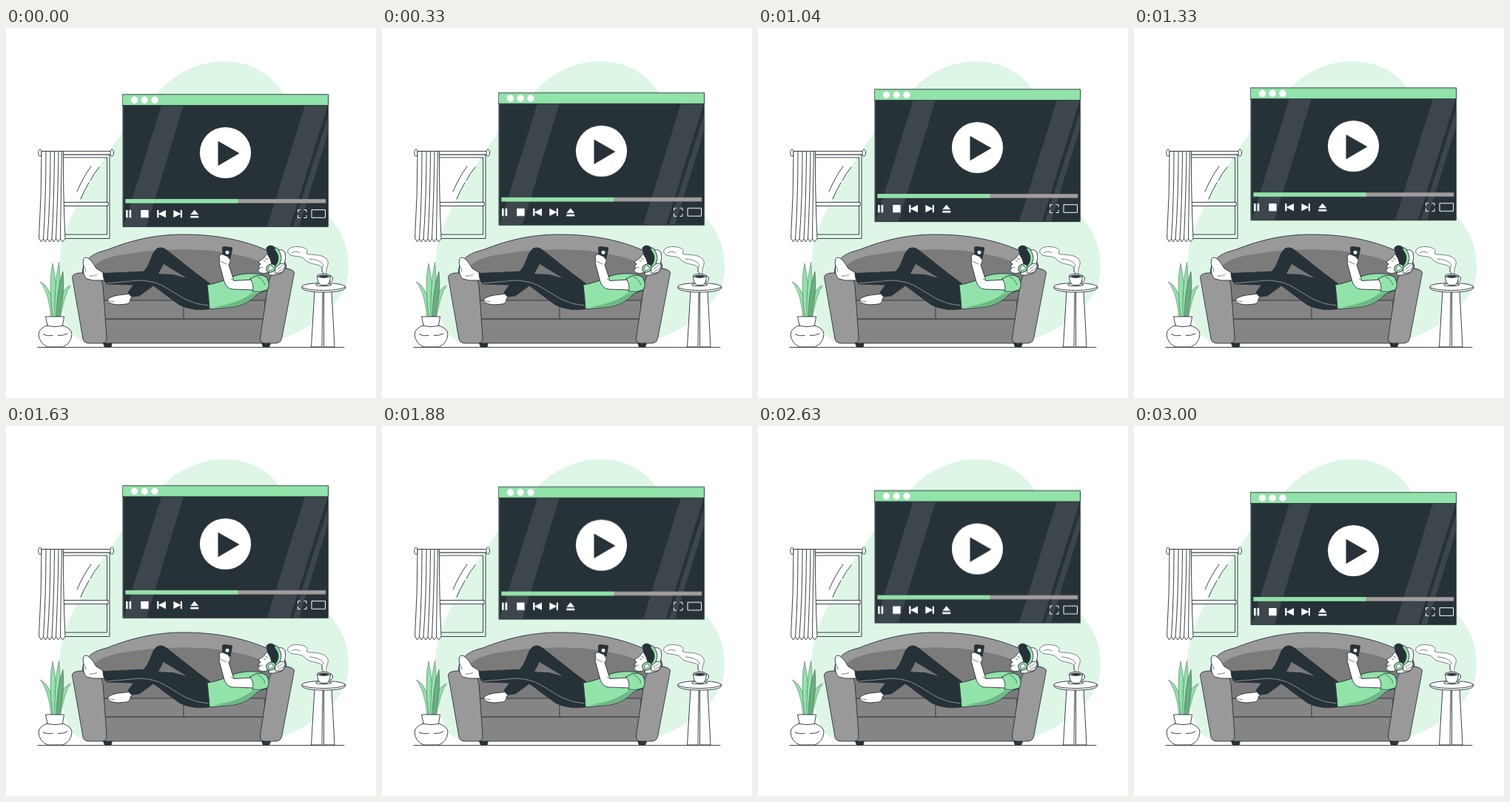
Animation, 500 px wide and 500 px high, one loop 3040 ms. Source, as an HTML page:

```html
<!DOCTYPE html>
<html lang="en">
<head>
<meta charset="utf-8">
<title>Watching from the sofa</title>
<style>
  html, body { margin: 0; width: 100%; height: 100%; overflow: hidden; background: #fff; }
  svg { display: block; width: 100vw; height: 100vh; }
  .line { fill: none; stroke: #263238; stroke-width: .9; stroke-linecap: round; stroke-linejoin: round; }
  .thin { stroke-width: .6; }
  .none { stroke: none; }
  .white { fill: #fff; }
  .green { fill: #92e3a9; }
  .dark { fill: #263238; }
  .light { fill: #999; }
  .mid { fill: #858585; }
  .deep { fill: #7b7b7b; }
  .seam { stroke: #c9cdcf; }
  #player { animation: float 3.04s linear infinite; }
  /* 3 s of travel, then a short rest before the loop */
  @keyframes float {
    0%, 98.684%, 100% { transform: translateY(0); }
    49.342% { transform: translateY(-10px); }
  }
</style>
</head>
<body>
<svg viewBox="0 0 500 500">
  <!-- backdrop -->
  <path fill="#def6e6" d="M205 88C226 63 258 45 295 45C334 45 360 64 376 90C393 123 397 155 408 190C416 220 426 240 441 260C456 279 463 298 463 322C463 347 450 370 432 385C416 399 402 409 380 417L350 425H110C91 421 82 405 78 386C72 361 70 335 73 308C76 279 91 246 109 215C123 190 140 164 157 142Z"/>

  <!-- window -->
  <g class="line">
    <path d="M78 171H140V284.500H78M78 175H136.500V279H78"/>
    <path class="white" d="M78 235.500H138V240.500H78Z"/>
    <path d="M96 221Q104 202 115 187M101 231Q106 219 112 209M114 206Q119 196 126 188"/>
    <rect class="white" x="46" y="166.500" width="98" height="4.500"/>
    <ellipse class="white" cx="46" cy="168.700" rx="2.200" ry="4.600"/>
    <ellipse class="white" cx="143.200" cy="168.700" rx="2.200" ry="4.600"/>
    <path class="white" d="M48 166.500H77.500Q77 220 80 285L76.500 289L73.500 285L70.500 289L67.500 285L64.500 289L62 285L59 289L56 285L53 289L50.500 285L47.500 289L44.500 284Q48 225 48 166.500Z"/>
    <path d="M54 167Q54 230 50.500 285M60 167Q60 230 56 285M65.500 167Q65 230 62 285M71 167Q70 230 67.500 285M75.500 167Q74 230 73.500 285"/>
  </g>

  <!-- floating player -->
  <g id="player">
    <rect class="line dark" x="158.300" y="104" width="277" height="164.600" style="fill:#263238"/>
    <path fill="#3c464c" d="M210 104H240L190 268H159ZM404 104H435L384 268H353ZM435.500 118V141L396 268H388Z"/>
    <rect class="line" x="157.600" y="89.800" width="277.900" height="14.800" style="fill:#92e3a9"/>
    <g class="white">
      <circle cx="173.500" cy="97.300" r="4.700"/>
      <circle cx="187.200" cy="97.300" r="4.700"/>
      <circle cx="201" cy="97.300" r="4.700"/>
      <circle cx="296.500" cy="168.500" r="34.600"/>
      <path d="M162 246H164.600V256.200H162ZM166.600 246H169.200V256.200H166.600ZM182.200 246H192.600V256.200H182.200ZM204.200 246H206.400V250.700L216 246V256.200L206.400 251.500V256.200H204.200ZM238 246H235.800V250.700L226.300 246V256.200L235.800 251.500V256.200H238ZM254.700 245.700L260.300 252.300H249.200ZM249.200 254H260.300V256.400H249.200Z"/>
    </g>
    <path class="dark" d="M286.500 152.700L315.500 169.300L286.500 186.300Z"/>
    <rect x="161.500" y="231.200" width="270.700" height="5.400" fill="#a49d9e"/>
    <rect class="green" x="161.500" y="231.200" width="152" height="5.400"/>
    <path fill="none" stroke="#fff" d="M394.500 249V245.700H398M402.500 245.700H406V249M406 253V256.500H402.500M398 256.500H394.500V253M413 245.700H431.500V256.300H413Z"/>
  </g>

  <path class="line" d="M43 431.500H457"/>

  <!-- sofa -->
  <path class="dark" d="M130.500 425H144L142.500 431H133ZM345 425H358.500L356 431H347Z"/>
  <g class="line">
    <path class="light" d="M104 336C100 315 117 304 136 300C176 284 208 279 240 279C288 279 324 288 352 300C369 304 380 312 379 328L352 385H132Z"/>
    <path class="none deep" d="M114 332C115 319 132 311 153 307C181 302 210 299 240 299.500C281 299 315 305 342 315L358 330L352 370H132Z"/>
    <path class="mid" d="M130 393H350L346 426H134Z"/>
    <path class="mid" d="M131 368H350V393H131ZM240 368V393"/>
    <path class="light" d="M89.500 336Q91 330.500 104 331H119Q128 334 131 348L136 418Q136 426 130 426H112Q105 426 104 420Z"/>
    <path class="light" d="M389.500 330Q387 325 376 325Q360 327 355 342L343.500 418Q343 426 349 426H364Q371 426 372.500 420Z"/>
  </g>

  <!-- person -->
  <g class="line">
    <path class="white" d="M170 359L152 361Q139 363 137 368Q138 373 151 374L163 373Q168 372 168.500 365L174 362Z"/>
    <path class="thin" d="M137.500 368Q142 370 146 369.500"/>
    <path class="dark" d="M204 298L191 323L165 357L169 363L180 362L209 341L230 315Z"/>
    <path class="white" d="M132 331L122 325Q113 309 107 310Q102.500 312 105 322Q103 333 109 339L118 341L133 341Z"/>
    <path class="thin" d="M105 322Q108 324 108 329M113 335Q119 336 123 333"/>
    <path class="dark" d="M131 331.500L189 329L199 304Q207 292 217 300L260 334L275 345L280 379Q253 384 234 374L199 348L136 346Q131 340 131 331.500Z"/>
    <path class="deep none" d="M213 319L206 332L226 333L244 338Z"/>
    <path class="seam thin" d="M136 345L181 341Q201 342 213 349L243 367Q258 374 274 375"/>
    <path class="green" d="M272 347C285 345 295 341 304 337C318 331 332 331 346 333L354 342Q356 350 352 355L340 359C332 368 321 375 307 377L275 380Q274 364 272 347Z"/>
    <path class="none" fill="#6fb886" style="fill:#6fb886" d="M280 377Q312 373 333 358L340 358.500Q326 375 300 377.500Z"/>
    <path class="white" d="M334 340L308 341.500L301 320Q305 313 302 308L295 305Q288 309 288 317L295 343Q298 352 306 353L335 354Z"/>
    <path class="thin" d="M289 315L298 319M308 341L304 339"/>
    <path class="dark" d="M294.500 295.500L304.500 296.500Q306 297 305.500 299L303 311L293 308.500L292.500 297Z"/>
    <circle class="none white" cx="299" cy="303.300" r="2.500"/>
    <path class="white" d="M288.500 312Q287 305 293 306L300 309L302 313"/>
    <path class="green" d="M330 339Q343 330 352 337Q358 346 353 354Q342 358 333 356Q336 347 330 339Z"/>
    <path class="thin" d="M340 336Q347 339 350 347"/>
    <!-- head -->
    <path class="white" d="M364 301Q372 297 377 303Q379 310 376 319Q378 326 373 331L362 334L355 334L357 315Z"/>
    <path class="white" d="M353 305L348 311L341 316L344 319L341 322L343 325L340 327Q343 333 352 331L363 326L364 308Z"/>
    <path class="thin" d="M348 314L351 316M350 311L354 313M343 323L347 324"/>
    <path class="dark" d="M352 297Q357 291 364 297Q371 305 367 319L360 322L357 312L354 307Z"/>
    <path style="stroke-width:4.600" d="M365 299Q375 311 365 323"/>
    <path style="stroke:#92e3a9;stroke-width:3.100" d="M365 299Q375 311 365 323"/>
    <g transform="rotate(-25 358 324.500)">
      <ellipse class="green" cx="358" cy="324.500" rx="6.500" ry="5.300"/>
      <ellipse class="thin white" cx="358" cy="324.500" rx="3.500" ry="2.700"/>
    </g>
    <path class="white" d="M364 324L370 319Q376 317 377 321Q377 328 371 331L364 331Z"/>
    <path class="thin" d="M367 326L374 321M368 329L375 325"/>
  </g>

  <!-- plant -->
  <g class="line green" style="stroke-width:.4;fill:#92e3a9">
    <path d="M61 391Q58 358 46.500 343Q63 351 67 391Z"/>
    <path d="M67 391Q70 356 87 348Q78 362 74 391Z"/>
    <path d="M63 391Q57 345 63 318Q70 350 69 391Z"/>
    <path d="M66 391Q65 346 71.500 317Q75 351 71 391Z"/>
    <path style="fill:#6cae80" d="M68 391Q69 350 77 329Q80 355 72 391Z"/>
  </g>
  <g class="line">
    <path class="white" d="M56 402L53.500 390H78.500L76.500 402Q89 406 89 414Q88 426 77 431H56Q45 426 44 414Q45 405 56 402Z"/>
    <path d="M56 402.500Q66 405 76.500 402.500M50 414Q57 417 63 415.500M70 415.500Q78 416 83 413"/>
  </g>

  <!-- side table -->
  <g class="line">
    <path class="white" d="M417 355L412.500 431H427L428 355ZM429.500 355V431H444L440 355Z"/>
    <path class="white" d="M400 349.500V352Q405 357 429 357Q454 357 458.500 352V349.500Z"/>
    <ellipse class="white" cx="429.200" cy="349.500" rx="29.300" ry="5"/>
    <path class="white thin" d="M433 333C421 331 431 325 424 321C415 318 408 319 402 311C395 307 385 310 381 304C379 298 387 295 394 295.500C403 296 410 299 406 304C407 308 424 304 432 311C440 318 431 322 433 333Z"/>
    <path class="thin" d="M386 304Q391 300 397 304M410 312Q425 313 429 320Q425 326 429 331"/>
    <ellipse class="white" cx="429" cy="347" rx="10.500" ry="1.800"/>
    <ellipse class="white" cx="438.500" cy="339" rx="3" ry="3.700"/>
    <path class="white" d="M420.500 335Q421 346 426 347.500H433Q438 346 438.500 335Z"/>
    <ellipse class="white" cx="429.500" cy="335" rx="9" ry="2.500"/>
    <ellipse class="none dark" cx="429.500" cy="335.300" rx="7.200" ry="1.600"/>
  </g>
</svg>
</body>
</html>
```
